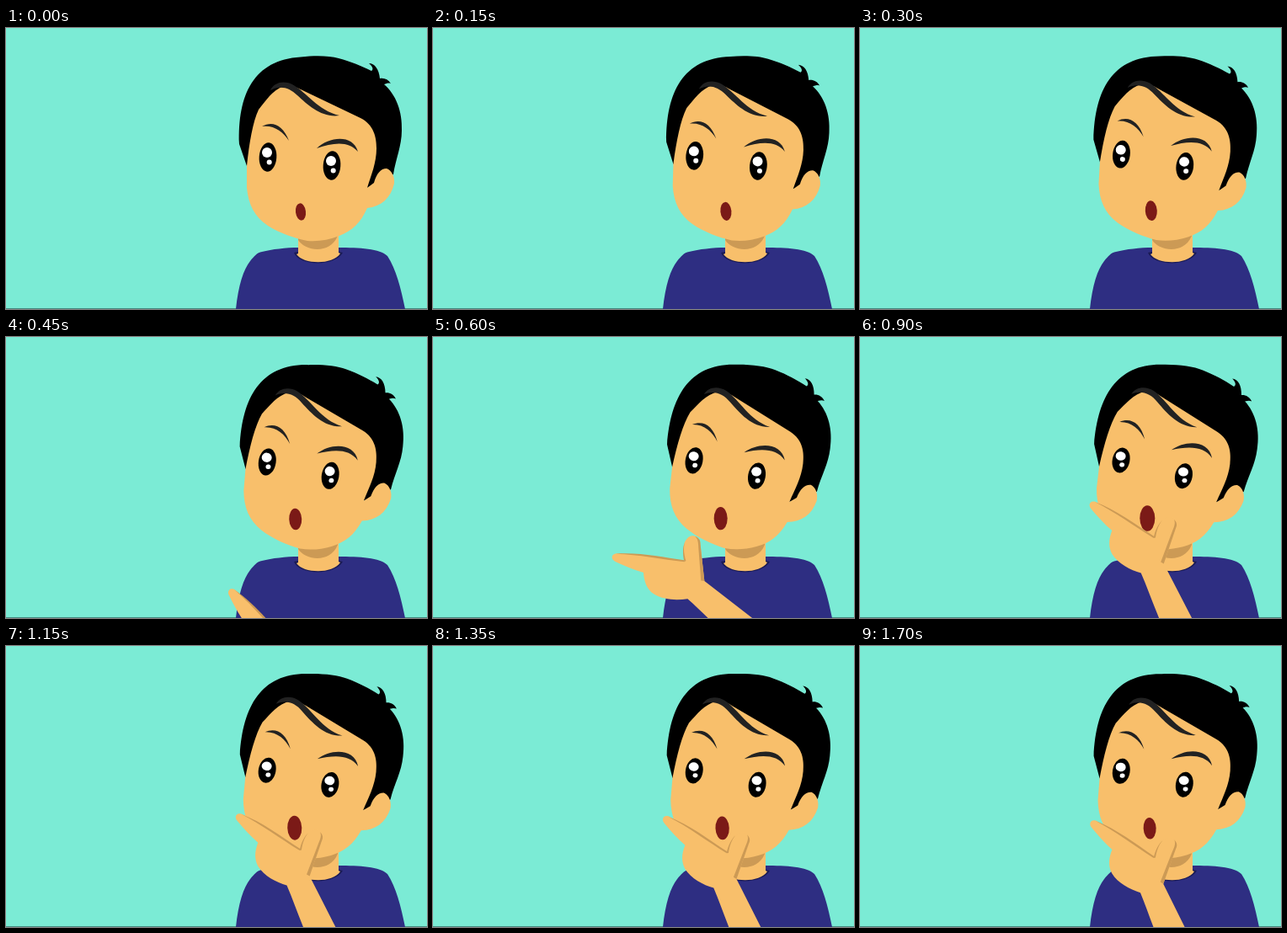
An HTML page for the animation above (2400 ms loop, 500x334 px).

```html
<!DOCTYPE html>
<html lang="en">
<head>
<meta charset="utf-8">
<title>Thinking man</title>
<style>
  html, body { margin: 0; width: 100%; height: 100%; overflow: hidden; background: #7bebd5; }
  svg { display: block; width: 100%; height: 100%; }
  .skin { fill: #f8bf6b; }
  .shade { fill: #cc9a55; }
  .dark { fill: #222; }
</style>
</head>
<body>
<svg viewBox="0 0 500 334">
  <defs>
    <g id="eye">
      <g id="lids">
        <ellipse rx="10.3" ry="17.2" transform="rotate(4)"/>
        <circle cx="-1" cy="-5.5" r="6" fill="#fff"/>
        <circle cx="1.7" cy="6" r="3" fill="#fff"/>
      </g>
    </g>
  </defs>
  <rect width="500" height="334" fill="#7bebd5"/>
  <rect y="333" width="500" height="1" fill="#458a80"/>

  <path fill="#2e2e82" d="M273 334C276 306 282 287 290 277C295 271 298 267 304 266C316 263 332 261 348 261H394C420 261 444 262 453 271C463 286 469 309 474 334Z"/>
  <path fill="#1b1b55" d="M342 267C347 283 391 284 400 267L396 266H346Z"/>
  <path class="skin" d="M347 240V268L345 269C353 281 388 282 397 268L395 267V240Z"/>
  <path class="shade" d="M347 252C356 266 385 269 394 247V240H347Z"/>

  <g id="head">
    <path d="M286 164L277 138C275 79 294 38 350 34.5C368 32.5 384 33 395 36C410 40 422 45 434 51C437 49 435 45 431 42C438 42 443 49 444 60C449 59 454 61 457 66C454 65 452 66 449 67C463 79 471 99 470 122C470 140 463 155 460 174L429 190Z"/>
    <path class="skin" d="M286 164C289 136 293 112 300 97C309 86 316 74 330 69C338 68 343 69 350 73L421 107C437 115 440 130 440 143C440 160 434 174 429 190L437 184C440 173 445 167 452 167C458 169 462 177 461 185C457 202 446 212 429 214C421 232 411 241 396 247C383 252 371 254 358 253C343 250 325 244 311 235C295 224 288 210 286 190Z"/>
    <path class="dark" d="M314 74C318 65 329 62 340 67C358 77 370 98 396 104C375 107 359 92 346 80C336 70 325 68 314 74Z"/>
    <g id="brows" class="dark">
      <path d="M304 117C316 110 329 115 336 134C329 123 318 115 304 117Z"/>
      <path d="M369 143C384 129 412 126 418 147C407 134 389 136 369 143Z"/>
    </g>
    <use href="#eye" x="311" y="153.5"/>
    <use href="#eye" x="387" y="163.5"/>
    <ellipse id="mouth" rx="6" ry="10.2" fill="#7b1a17"/>
  </g>

  <!-- The hand's origin is the fork between thumb and index finger. -->
  <g id="hand">
    <path class="skin" d="M0 0C-26 -8 -52 -16 -76 -21C-84 -23 -87 -16 -81 -12C-72 -6 -61 1 -50 6C-51 17 -49 26 -42 33C-32 42 -16 45 -3 45C7 57 17 71 28 85L84 158L134 148L20 27L22 -20C21 -26 16 -29 11 -28C3 -25 1 -16 1 -9Z"/>
    <path class="shade" d="M-79 -21C-52 -19 -26 -9 0 -1V1C-26 -6 -52 -16 -79 -21Z"/>
    <path class="shade" d="M0 1C-1 -9 1 -17 4 -22C1 -15 1 -8 2 0Z"/>
    <path class="shade" d="M17 -27C21 -25 23 -22 22 -17L20 27L16 26L19 -12C20 -20 20 -24 17 -27Z"/>
  </g>
</svg>
<script>
  const LOOP = 2400, STEP = 50;
  const start = performance.now();
  const [head, brows, lids, mouth, hand] =
    ["head", "brows", "lids", "mouth", "hand"].map(id => document.getElementById(id));

  const handStart = { x: 368, y: 445, turn: 73 };
  const handMoves = [
    { from: 350, to: 550, x: -78, y: -174, turn: -86 }, // swing up
    { from: 550, to: 900, x: 59, y: -33, turn: 29 },    // reach the chin
    { from: 900, to: 1700, x: 0, y: 13, turn: 1 }       // settle
  ];

  const progress = (time, from, to) => Math.min(1, Math.max(0, (time - from) / (to - from)));
  const easeOut = k => Math.sin(k * Math.PI / 2);

  function handPose(time) {
    const pose = { ...handStart };
    for (const move of handMoves) {
      const k = progress(time, move.from, move.to);
      for (const part in pose) pose[part] += move[part] * k;
    }
    return pose;
  }

  function draw() {
    const elapsed = Math.max(0, performance.now() - start) % LOOP;
    const time = Math.floor(elapsed / STEP) * STEP;

    const tilt = progress(time, 0, 700) - 0.4 * easeOut(progress(time, 750, 1650));
    const surprise = progress(time, 0, 900);
    const open = 1 + 0.5 * surprise - 0.25 * progress(time, 900, 1700);
    const { x, y, turn } = handPose(time);

    head.setAttribute("transform", `rotate(${7.4 * tilt} 371 142)`);
    brows.setAttribute("transform", `translate(0 ${-8.5 * surprise})`);
    lids.setAttribute("transform", `scale(1 ${1 - 0.12 * surprise})`);
    mouth.setAttribute("transform", `translate(350 218.5) rotate(-7) scale(${open})`);
    hand.setAttribute("transform", `translate(${x} ${y}) rotate(${turn})`);
    requestAnimationFrame(draw);
  }
  draw();
</script>
</body>
</html>
```
